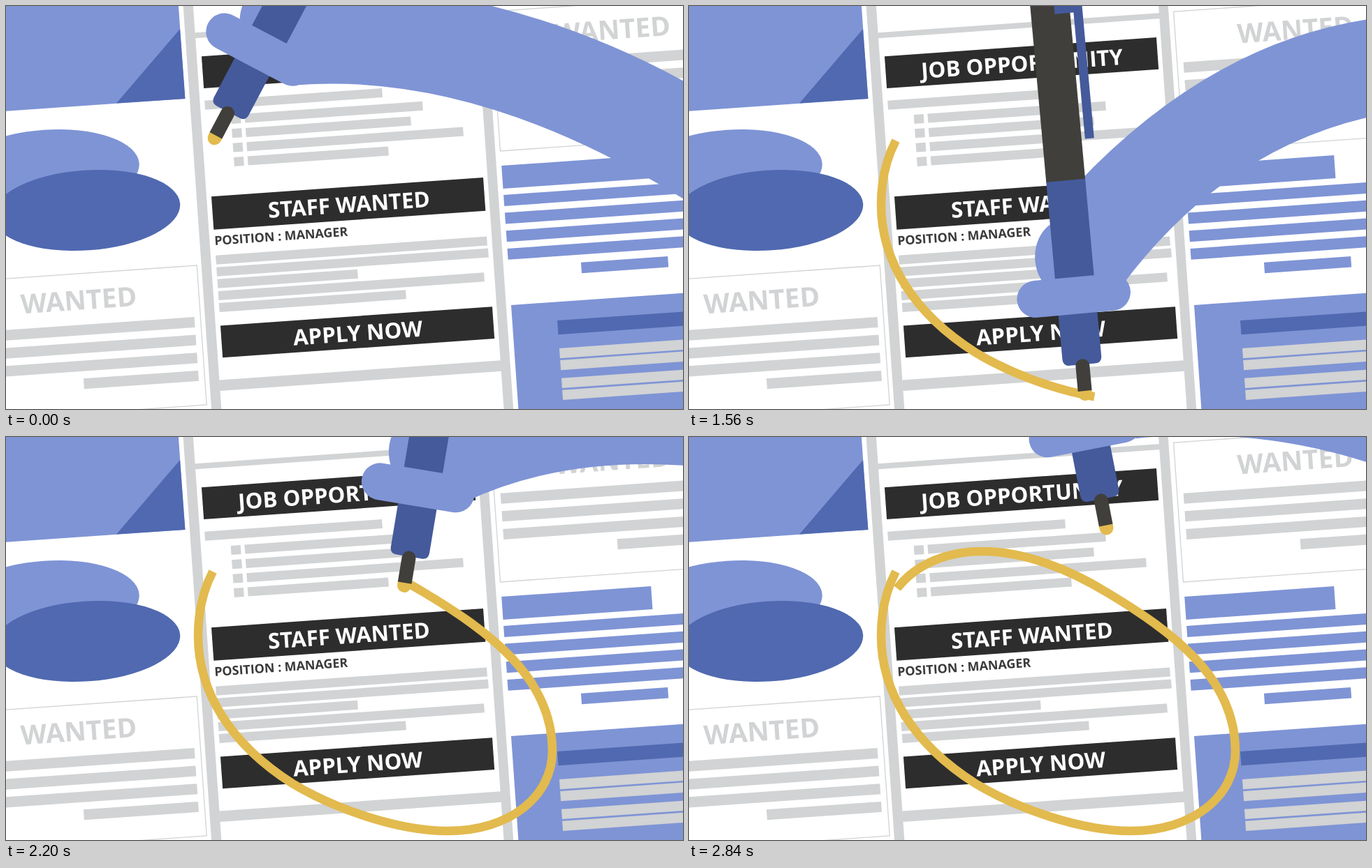
These frames come from a looping animation (969 by 578 pixels, 3.84 s). An HTML page:

```html
<!DOCTYPE html>
<html lang="en">
<head>
<meta charset="utf-8">
<title>Job search</title>
<style>
  html, body { margin: 0; width: 100%; height: 100%; overflow: hidden; background: #fff; }
  svg { display: block; width: 100vw; height: 100vh; }
  text { font-family: "Open Sans", "Noto Sans", sans-serif; font-weight: 700; }
</style>
</head>
<body>
<svg viewBox="0 0 969 578">
  <rect width="969" height="578" fill="#fff"/>
  <g id="paper" transform="rotate(-4)"></g>
  <path d="M249 33L256.500 133L158 139.500Z" fill="#5069b0"/>
  <ellipse rx="133" ry="57.500" transform="translate(58 235) rotate(-4)" fill="#7f94d5"/>
  <ellipse rx="134.500" ry="57.500" transform="translate(115 293) rotate(-4)" fill="#5069b0"/>
  <path id="ring" fill="none" stroke="#e2ba4e" stroke-width="12.500"
    d="M296 193C281 222 275 252 275 285C275 366 322 441 410 497C470 533 560 565 632 565
       C722 565 782 515 782 450C782 345 690 278 600 224C545 190 480 164 420 164C370 164 325 182 298 217"/>
  <path id="arm" fill="#7f94d5"/>
  <g id="hand">
    <ellipse cx="-7" cy="-196" rx="47" ry="56" fill="#7f94d5"/>
    <rect x="-28" y="-680" width="56" height="374" fill="#403f3b"/>
    <path d="M6 -640H46V-364H33V-546H6Z" fill="#455a9b"/>
    <path d="M-28 -307H28V-52Q28 -42 18 -42H-18Q-28 -42 -28 -52Z" fill="#455a9b"/>
    <rect x="-10" y="-14" width="20" height="24" rx="10" fill="#e2ba4e"/>
    <path d="M-10 -4V-40A10 10 0 0 1 10 -40V-4Z" fill="#403f3b"/>
    <rect x="-85" y="-168" width="163" height="53" rx="26.500" fill="#7f94d5"/>
  </g>
</svg>
<script>
const GRAY = '#d1d3d4', BLACK = '#2d2d2d', BLUE = '#7f94d5', NAVY = '#5069b0';
const $ = id => document.getElementById(id);

// ---- Newspaper page, in its own unrotated coordinates ----
const rect = (x, y, w, h, fill = GRAY) =>
  `<rect x="${x}" y="${y}" width="${w}" height="${h}" fill="${fill}"/>`;
const label = (s, x, y, size, fill, anchor = 'middle') =>
  `<text x="${x}" y="${y}" font-size="${size}" fill="${fill}" text-anchor="${anchor}">${s}</text>`;
const rows = (n, f) => Array.from({ length: n }, (_, i) => f(i)).join('');

const banner = (s, y, h, base) =>
  rect(274.2, y, 390, h, BLACK) + label(s, 469.7, base, 31.3, '#fff');

const wantedBox = (x, y) =>
  `<rect x="${x}" y="${y}" width="344.300" height="200.400" fill="none" stroke="${GRAY}" stroke-width="1.300"/>` +
  label('WANTED', x + 172, y + 51.7, 38.6, GRAY) +
  rows(4, i => rect(x + (i < 3 ? 9 : 171), y + 73.5 + 25.7 * i, i < 3 ? 326.5 : 164.5, 15));

const bulletEnds = [585, 566.6, 640.3, 531.6];
const lineEnds = [663.3, 664, 475.4, 655.7, 542.2];

$('paper').innerHTML =
  rect(-80, -80, 326.3, 230.5, BLUE) +
  rect(253, -60, 14.2, 760) + rect(670.5, -60, 13.6, 800) +
  rect(267, 57, 404, 8) + rect(267, 556.5, 404, 15.5) +
  wantedBox(-97.7, 390.2) + wantedBox(691.3, 56.4) +
  banner('JOB OPPORTUNITY', 91.5, 46, 127) +
  rect(274, 155.3, 254.5, 13) +
  rows(4, i => rect(310, 178 + 20.4 * i, 14, 13) +
    rect(329.8, 178 + 20.4 * i, bulletEnds[i] - 329.8, 13)) +
  banner('STAFF WANTED', 293, 47.8, 329.5) +
  label('POSITION : MANAGER', 274, 363, 17.9, '#3a3a3a', 'start') +
  rows(5, i => rect(274.3, 377.8 + 17.1 * i, lineEnds[i] - 274.3, 13)) +
  banner('APPLY NOW', 478.7, 46, 514.2) +
  rect(691.5, 278, 214.5, 33, BLUE) +
  rows(4, i => rect(691.5, 320 + 25.7 * i, 360, 16, BLUE)) +
  rect(795.3, 424.2, 124.5, 15.5, BLUE) +
  rect(691.3, 478.3, 400, 250, BLUE) +
  rect(755.7, 505, 400, 20.3, NAVY) +
  [545, 562, 588, 605].map(y => rect(755.8, y, 400, 14.3)).join('');

// ---- Hand ----
// step, tip x, tip y, tilt, upper and lower wrist heights along the pen,
// then control x, control y and end y for the arm's upper and lower edge
const POSES = [
  [-1, 298.5, 189.3, 27.8, 262, 121, 760, -26, 143, 700, 91, 316],
  [0, 297.7, 204.9, 24, 262, 120, 716, -28, 158, 695, 100, 325],
  [7, 567, 556, -5.2, 300, 150, 770, 28, 13, 783, 182, 149],
  [11, 769.5, 405, -9, 275, 150, 869, 35, -26, 902, 189, 114],
  [15, 570, 213, 9.4, 260, 133, 820, -110, -100, 816, 18, 47],
  [19, 300, 214, 27, 262, 120, 720, -25, 155, 697, 100, 322],
  [20, 327, 257, 16.5, 256, 121, 678, -38, 118, 682, 92, 282],
  [23, 597.5, 130.5, -11, 250, 118, 780, -190, -100, 845, -18, 58]
];
const START = 1000, STEP = 80, LOOP = 3840, LAST = 23, DRAWN = 19, FIRST_INK = 17, EDGE = 1030;

const ring = $('ring');
const total = ring.getTotalLength();
const ink = k => k < 0 ? 0 : FIRST_INK + (total - FIRST_INK) * Math.min(k, DRAWN) / DRAWN;

// Tip positions become offsets from the ring, so the pen follows the curve.
for (const p of POSES) {
  const q = ring.getPointAtLength(ink(p[0]));
  p[1] -= q.x;
  p[2] -= q.y;
}

function poseAt(k) {
  const i = Math.max(1, POSES.findIndex(p => p[0] >= k));
  const a = POSES[i - 1], b = POSES[i];
  const f = (k - a[0]) / (b[0] - a[0]);
  return a.map((v, j) => v + (b[j] - v) * f);
}

function draw(k) {
  const len = ink(k);
  const [, dx, dy, tilt, up, low, ux, uy, uEnd, lx, ly, lEnd] = poseAt(k);
  const q = ring.getPointAtLength(len);
  const x = q.x + dx, y = q.y + dy;
  const c = Math.cos(tilt * Math.PI / 180), s = Math.sin(tilt * Math.PI / 180);
  const at = (px, py) => `${x + px * c - py * s} ${y + px * s + py * c}`;

  ring.setAttribute('stroke-dasharray', `${len} ${total + 100}`);
  $('hand').setAttribute('transform', `translate(${x} ${y}) rotate(${tilt})`);
  $('arm').setAttribute('d',
    `M${at(15, -up)}Q${ux} ${uy} ${EDGE} ${uEnd}V${lEnd}Q${lx} ${ly} ${at(67, -low)}L${at(0, -150)}Z`);
}

const origin = performance.now();
function tick() {
  const t = (performance.now() - origin) % LOOP;
  draw(Math.max(-1, Math.min(LAST, Math.floor((t - START) / STEP))));
  requestAnimationFrame(tick);
}
tick();
</script>
</body>
</html>
```
